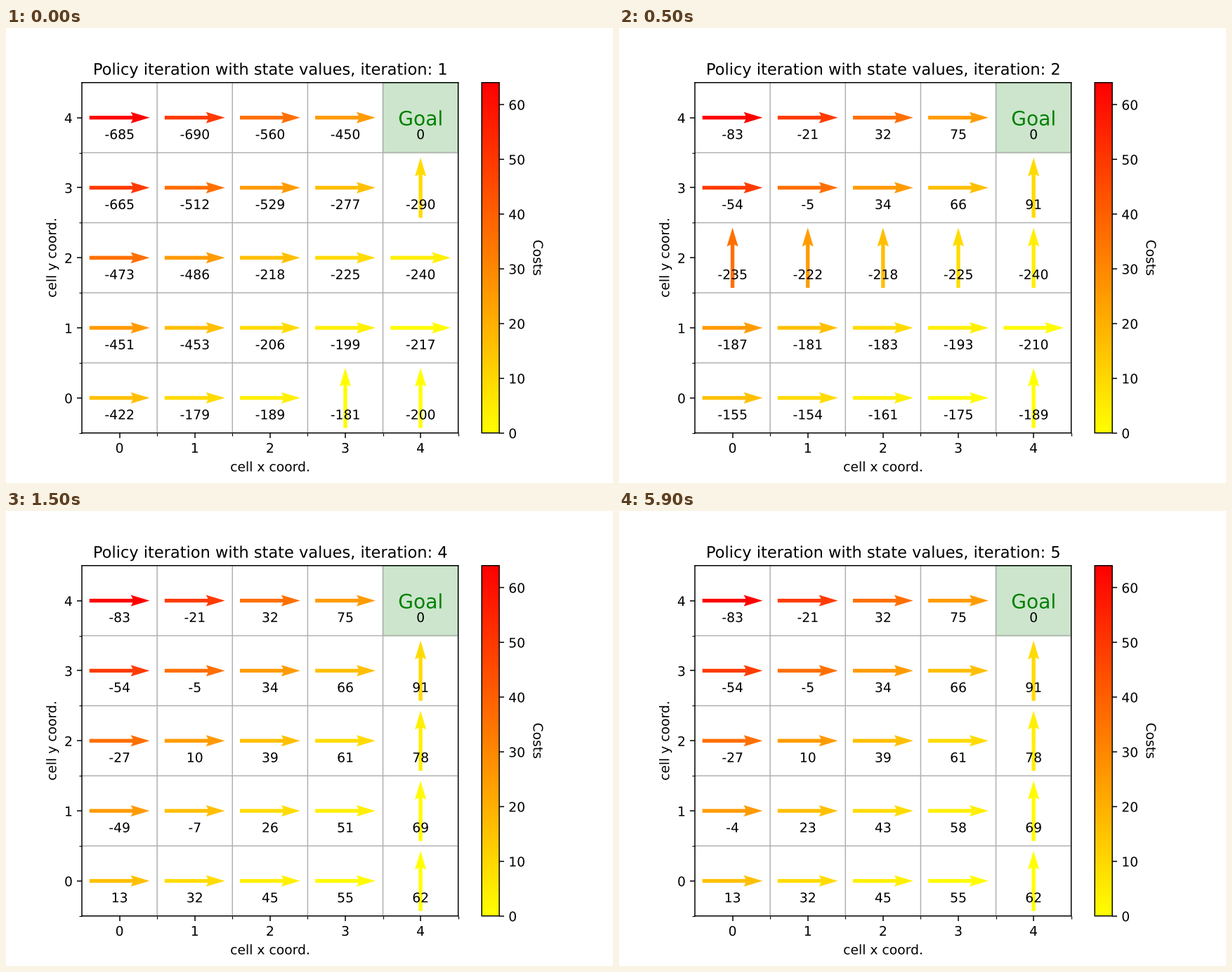
Animation of 864x648 px, one loop 8500 ms. Source, as a matplotlib script:

```python
import numpy as np
import matplotlib.pyplot as plt
from matplotlib.animation import FuncAnimation
from matplotlib.patches import Rectangle
from matplotlib.patheffects import Normal
from matplotlib.text import Text

SIZE = 5
GOAL = SIZE - 1, SIZE - 1
GAMMA, GOAL_REWARD, WALL_PENALTY, TOLERANCE = 0.9, 100, 20, 0.01
ITERATIONS = 5
STEP_MS, LOOP_MS = 500, 8500
# First guess of the policy, top row first: R = right, U = up.
START_POLICY = "RUUUR URURR RURRR UUURU URURR"

plt.rcParams.update({"font.family": "DejaVu Sans", "path.snap": False})

ys, xs = np.indices((SIZE, SIZE))
costs = (SIZE - 1 - xs + ys) ** 2


def action_values(values):
    """Return of going right and of going up, for every cell [y, x]."""
    right = np.column_stack([values[:, 1:], values[:, -1]])
    up = np.vstack([values[1:], values[-1]])
    q = GAMMA * np.stack([right, up]) - costs
    q[0, :, -1] -= WALL_PENALTY
    q[1, -1, :] -= WALL_PENALTY
    q[0, -1, -2] += GOAL_REWARD
    q[1, -2, -1] += GOAL_REWARD
    q[:, -1, -1] = 0
    return q


def evaluate(policy, values):
    change = np.inf
    while change >= TOLERANCE:
        updated = np.where(policy, *action_values(values)[::-1])
        change = np.abs(updated - values).max()
        values = updated
    return values


def iterate_policy():
    """List of (values, improved policy), one pair per iteration."""
    policy = np.array([[move == "U" for move in row]
                       for row in START_POLICY.split()[::-1]])
    values = np.zeros((SIZE, SIZE))
    history = []
    for _ in range(ITERATIONS):
        values = evaluate(policy, values)
        policy = action_values(values).argmax(axis=0).astype(bool)
        history.append((values, policy))
    return history


history = iterate_policy()
movable = (xs, ys) != GOAL if SIZE == 1 else ~((xs == GOAL[0]) & (ys == GOAL[1]))

fig, ax = plt.subplots(figsize=(6.4, 4.8), dpi=135)
ax.set(xlim=(-0.5, SIZE - 0.5), ylim=(-0.5, SIZE - 0.5),
       xlabel="cell x coord.", ylabel="cell y coord.",
       xticks=range(SIZE), yticks=range(SIZE))
ax.set_xticks(np.arange(SIZE) + 0.5, minor=True)
ax.set_yticks(np.arange(SIZE) - 0.5, minor=True)
ax.grid(which="minor")
title = ax.set_title("")

ax.add_patch(Rectangle((GOAL[0] - 0.5, GOAL[1] - 0.5), 1, 1,
                       color="green", alpha=0.2))
ax.text(*GOAL, "Goal", color="green", size=15, ha="center", va="center_baseline")

moves_up = history[0][1][movable]
arrows = ax.quiver(xs[movable], ys[movable], ~moves_up, moves_up, costs[movable],
                   cmap="autumn_r", clim=(0, costs.max()), pivot="mid",
                   units="width", width=0.01, scale_units="width", scale=6.25)
bar = fig.colorbar(arrows, ax=ax)
bar.ax.set_ylabel("Costs", rotation=-90, va="bottom")

labels = {(y, x): ax.text(x, y - 0.25, "", ha="center", va="center")
          for y, x in np.ndindex(SIZE, SIZE)}

# A path effect draws text as outlines, placed to fractions of a pixel.
for text in fig.findobj(Text):
    text.set_path_effects([Normal()])


def update(frame):
    step = min(frame, ITERATIONS - 1)
    values, policy = history[step]
    up = policy[movable]
    title.set_text(f"Policy iteration with state values, iteration: {step + 1}")
    arrows.set_UVC(~up, up, costs[movable])
    for cell, label in labels.items():
        label.set_text(f"{values[cell]:.0f}")
    return [title, arrows, *labels.values()]


anim = FuncAnimation(fig, update, frames=LOOP_MS // STEP_MS,
                     interval=STEP_MS, repeat=True, repeat_delay=0)
plt.show()
```
